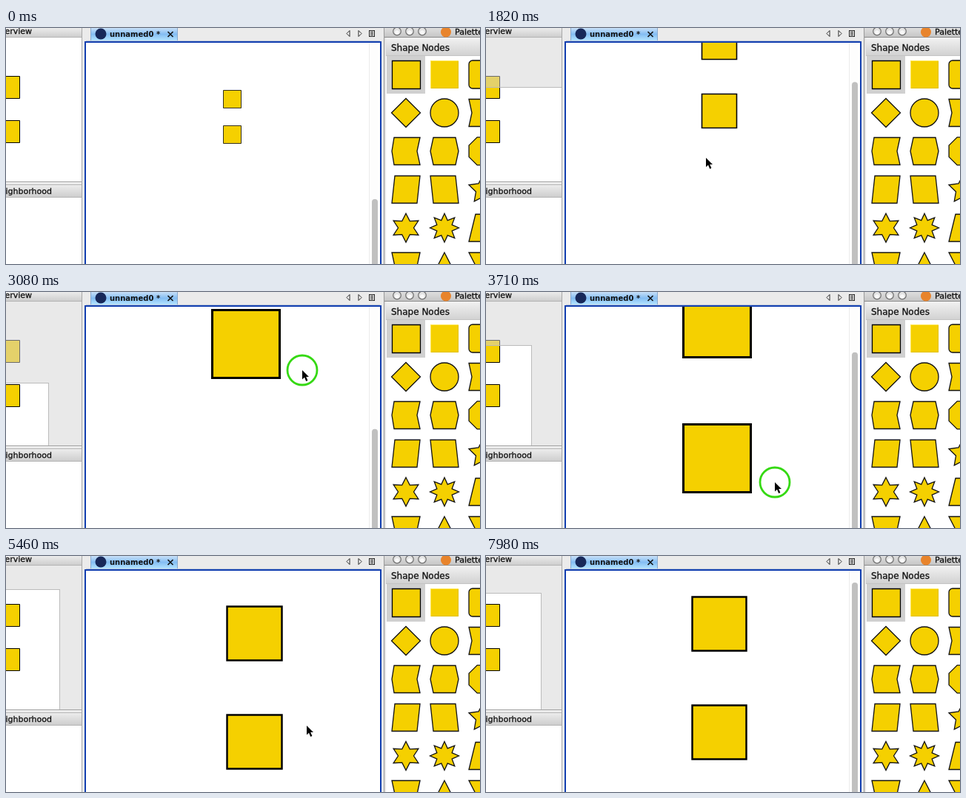
These frames come from a looping animation (640 by 320 pixels, 8.05 s). An HTML page with a canvas:

```html
<!DOCTYPE html>
<html lang="en">
<head>
<meta charset="utf-8">
<title>Zooming and panning a graph editor</title>
<style>
  html, body { margin: 0; width: 100%; height: 100%; overflow: hidden; background: #fff; }
  canvas { display: block; width: 640px; height: 320px; }
</style>
</head>
<body>
<canvas id="stage" width="640" height="320"></canvas>
<script>
const ctx = document.getElementById('stage').getContext('2d');
const LOOP = 8050, TICK = 70, YELLOW = '#f5d000', INK = '#111';
const NODE = 30, GAP = 60, LAG = 20;

const ZOOM_START = 1540, ZOOM_TICKS = 7, ZOOM_STEPS = 6, ZOOM_OUT = 4830;
const PIVOT_IN = { x: 296.5, y: 177 }, PIVOT_OUT = { x: 405, y: 232.5 };
const DRAGS = [{ from: 3010, to: 4200 }, { from: 5670, to: 6440 }];

// Pointer glides: each leaves at `from` and reaches x, y at `to`.
const GLIDES = [
  { from: 0, to: 70, x: 300, y: 250 },
  { from: 70, to: 280, x: 281, y: 190 },
  { from: 560, to: 770, x: 297, y: 176 },
  { from: 2100, to: 2940, x: 410.5, y: 82.5 },
  { from: 3010, to: 3080, x: 400, y: 106 },
  { from: 3080, to: 3710, x: 390, y: 258 },
  { from: 3780, to: 4130, x: 396, y: 288 },
  { from: 4200, to: 4620, x: 406, y: 230 },
  { from: 5460, to: 5670, x: 418, y: 234 },
  { from: 5670, to: 6370, x: 397.5, y: 221 },
  { from: 6650, to: 7140, x: 480, y: 300 }
];

const clamp = (v, lo, hi) => Math.min(hi, Math.max(lo, v));
const easeOut = u => 1 - (1 - u) ** 1.4;

function pointer(t) {
  let { x, y } = GLIDES[0];
  for (const g of GLIDES) {
    const u = easeOut(clamp((t - g.from) / (g.to - g.from), 0, 1));
    x += (g.x - x) * u;
    y += (g.y - y) * u;
  }
  return { x, y };
}

// The view trails the dragging pointer slightly.
function pan(t, drag) {
  const a = pointer(drag.from), b = pointer(clamp(t - LAG, drag.from, drag.to));
  return { x: b.x - a.x, y: b.y - a.y };
}

// Scale, and screen position of the lower node's centre.
function camera(t) {
  const ticks = clamp((t - ZOOM_START) / TICK, 0, ZOOM_TICKS);
  const steps = Math.round(ZOOM_STEPS * ticks / ZOOM_TICKS);
  const grow = 1.25 ** steps;
  const [d1, d2] = DRAGS.map(d => pan(t, d));
  let z = 0.8 * grow;
  let x = PIVOT_IN.x + 9.45 * grow + d1.x;
  let y = PIVOT_IN.y - 33 * grow + d1.y;
  if (t >= ZOOM_OUT) {
    z *= 0.8;
    x = PIVOT_OUT.x + (x - PIVOT_OUT.x) * 0.8 + d2.x;
    y = PIVOT_OUT.y + (y - PIVOT_OUT.y) * 0.8 + d2.y;
  }
  const above = (y - 20) / z - NODE / 2;
  const hidden = 80 - above;
  const thumb = steps ? 25 + hidden * Math.min(2.05, z * 0.864) : 232;
  return { z, x, y, above, thumb, bar: !steps || hidden > 1 };
}

function box(x, y, w, h, fill) {
  ctx.fillStyle = fill;
  ctx.fillRect(x, y, w, h);
}

function shade(x, y, w, h, ...stops) {
  const g = ctx.createLinearGradient(0, y, 0, y + h);
  stops.forEach((c, i) => g.addColorStop(i / (stops.length - 1), c));
  box(x, y, w, h, g);
}

function paint(fill, stroke, width = 1.3) {
  if (fill) { ctx.fillStyle = fill; ctx.fill(); }
  if (stroke) { ctx.strokeStyle = stroke; ctx.lineWidth = width; ctx.stroke(); }
}

function poly(points, fill = YELLOW, stroke = INK, width) {
  ctx.beginPath();
  for (const [x, y] of points) ctx.lineTo(x, y);
  ctx.closePath();
  paint(fill, stroke, width);
}

function disc(x, y, r, fill, stroke, width) {
  ctx.beginPath();
  ctx.arc(x, y, r, 0, Math.PI * 2);
  paint(fill, stroke, width);
}

function round(x, y, w, h, r, fill, stroke) {
  ctx.beginPath();
  ctx.roundRect(x, y, w, h, r);
  paint(fill, stroke);
}

// Edges snap to pixel centres.
function square(cx, cy, size, width) {
  const snap = v => Math.floor(v) + 0.5;
  const l = snap(cx - size / 2), r = snap(cx + size / 2);
  const t = snap(cy - size / 2), b = snap(cy + size / 2);
  poly([[l, t], [r, t], [r, b], [l, b]], YELLOW, '#000', width);
}

function label(text, x, y, size, weight = 'normal') {
  ctx.font = `${weight} ${size}px "DejaVu Sans", sans-serif`;
  ctx.fillStyle = ctx.strokeStyle = INK;
  ctx.fillText(text, x, y);
  if (weight === 'normal') {
    ctx.lineWidth = 0.3;
    ctx.strokeText(text, x, y);
  }
}

function clipped(x, y, w, h, draw) {
  ctx.save();
  ctx.beginPath();
  ctx.rect(x, y, w, h);
  ctx.clip();
  draw();
  ctx.restore();
}

function heading(text, x, y, h) {
  shade(0, y, 102, h, '#ececec', '#cecece');
  box(0, y + h, 102, 1, '#b4b4b4');
  label(text, x, y + h - 4, 11);
}

function sidebar(cam) {
  box(0, 0, 102, 320, '#fff');
  clipped(0, 13, 102, 195, () => {
    const cx = 3.5, cy = 140.5;
    square(cx, cy - GAP, NODE, 1);
    square(cx, cy, NODE, 1);
    const right = Math.round(cx + ((cam.bar ? 490 : 505) - cam.x) / cam.z) - 1;
    const top = Math.round(cy - NODE / 2 - cam.above);
    ctx.beginPath();
    ctx.rect(0, 13, 102, 195);
    ctx.rect(-300, top, right + 300, 600);
    ctx.fillStyle = 'rgba(211,211,211,.5)';
    ctx.fill('evenodd');
    ctx.strokeStyle = '#bbb';
    ctx.lineWidth = 1;
    ctx.strokeRect(-300, top - 0.5, right + 300.5, 600);
  });
  heading('Overview', -16.7, 0, 12);
  box(0, 208, 102, 5, '#ececec');
  box(0, 208, 102, 1, '#a4a4a4');
  box(0, 212, 102, 1, '#b4b4b4');
  heading('Neighborhood', -15.5, 213, 16);
  box(102, 0, 1, 320, '#a8a8a8');
}

function tabBar() {
  shade(114, 0, 118, 17, '#c8e0f8', '#84bdf3', '#b4e4ff');
  box(114, 0, 1, 17, '#8aa9cf');
  box(231, 0, 1, 17, '#8aa9cf');
  box(108, 17, 397, 1, '#b8c4d8');
  disc(128, 8, 7.5, '#17285a');
  label('unnamed0 *', 140, 12, 10, 'bold');
  for (const s of [-1, 1]) {
    poly([[222 - 3.5, 8.5 - 3.5 * s], [222 + 3.5, 8.5 + 3.5 * s]], null, INK, 1.6);
    const x = 470 + 8 * s;
    poly([[x + 2 * s, 7.5], [x - 2 * s, 3.5], [x - 2 * s, 11.5]], '#fff', '#222', 1);
  }
  ctx.strokeRect(490.5, 3.5, 7, 8);
  for (let y = 5; y < 11; y += 2) box(492, y, 4, 1, '#222');
}

function editor(cam) {
  box(107, 20, 399, 300, '#fff');
  clipped(108, 20, 397, 300, () => {
    square(cam.x, cam.y - GAP * cam.z, NODE * cam.z, cam.z);
    square(cam.x, cam.y, NODE * cam.z, cam.z);
    if (cam.bar) {
      box(490, 20, 15, 300, '#fdfdfd');
      box(490, 20, 1, 300, '#ececec');
      round(494, cam.thumb, 8, 400, 4, '#c0c0c0');
    }
  });
  ctx.strokeStyle = '#123fb0';
  ctx.lineWidth = 2;
  ctx.strokeRect(107, 19, 399, 320);
  tabBar();
}

// Palette shapes are drawn around 0, 0 within a half size of R.
const R = 19;

function star(n, outer = 19.5, inner = outer, turn = 0) {
  poly(Array.from({ length: n * 2 }, (_, i) => {
    const a = Math.PI * (i / n - 0.5) + turn, r = i % 2 ? inner : outer;
    return [r * Math.cos(a), r * Math.sin(a)];
  }));
}

// Insets of the top, middle and bottom of the left and right sides.
function sides(left, right = left) {
  const row = [-18.5, 0, 18.5];
  poly([
    ...right.map((d, i) => [R - d, row[i]]),
    ...left.map((d, i) => [d - R, row[i]]).reverse()
  ]);
}

function bevel() {
  box(-R, -R, 2 * R, 2 * R, '#ffe85a');
  box(1 - R, 1 - R, 2 * R - 1, 2 * R - 1, '#e0c000');
  box(1 - R, 1 - R, 2 * R - 2, 2 * R - 2, YELLOW);
}

const SHAPES = [
  () => square(0, 0, 2 * R, 1.3),
  bevel,
  () => round(-R, -R, 2 * R, 2 * R, 5, YELLOW, INK),
  () => star(2),
  () => disc(0, 0, R, YELLOW, INK),
  () => sides([0, 4, 0]),
  () => sides([3, 0, 3], [0, 4, 0]),
  () => sides([4, 0, 4]),
  () => star(4, 20.5, 20.5, Math.PI / 8),
  () => sides([4, 2, 0], [0, 2, 4]),
  () => sides([0, 2, 4], [4, 2, 0]),
  () => star(5, 20, 10),
  () => star(6, 19.5, 10.5),
  () => star(8, 19.5, 11),
  () => sides([9, 4.5, 0]),
  () => sides([0, 4, 8]),
  () => sides([R, R / 2, 0]),
  () => sides([0, R / 2, R])
];

function palette() {
  box(511, 0, 129, 320, '#fff');
  shade(511, 0, 129, 12, '#dedede', '#c6c6c6');
  box(511, 12, 129, 1, '#8c8c8c');
  for (let x = 528; x < 570; x += 17) {
    disc(x, 4.5, 5.3, '#e4e4e4', '#707070', 1.2);
    disc(x, 6, 2.8, '#f8f8f8');
  }
  disc(594, 5.5, 7, '#e8842c');
  label('Palette', 606, 9, 11);
  shade(513, 13, 127, 24, '#f2f2f2', '#d2d2d2');
  box(513, 37, 127, 1, '#c4c4c4');
  label('Shape Nodes', 520, 31, 12);
  box(510, 0, 1, 320, '#9a9a9a');
  box(511, 13, 2, 307, '#e4e4e4');
  box(514, 38, 52, 51, '#d0d0d0');
  SHAPES.forEach((draw, i) => {
    ctx.save();
    ctx.translate(540 + 52 * (i % 3), 63 + 52 * Math.floor(i / 3));
    draw();
    ctx.restore();
  });
}

function cursor(t) {
  if (t < 70 || t >= 7280) return;
  const { x, y } = pointer(t);
  if (DRAGS.some(d => t >= d.from && t <= d.to)) disc(x, y, 20, null, '#35d912', 2.8);
  const arrow = [[0, 0], [0, 12.5], [3, 9.8], [5.2, 15], [7.4, 14], [5.2, 9], [9, 9]]
    .map(([dx, dy]) => [x + dx, y + dy]);
  poly(arrow, null, '#fff', 1.8);
  poly(arrow, '#000', null);
}

function frame(now) {
  const t = Math.floor((now % LOOP) / TICK) * TICK;
  const cam = camera(t);
  box(0, 0, 640, 320, '#ebebeb');
  sidebar(cam);
  editor(cam);
  palette();
  cursor(t);
  requestAnimationFrame(frame);
}

requestAnimationFrame(frame);
</script>
</body>
</html>
```
